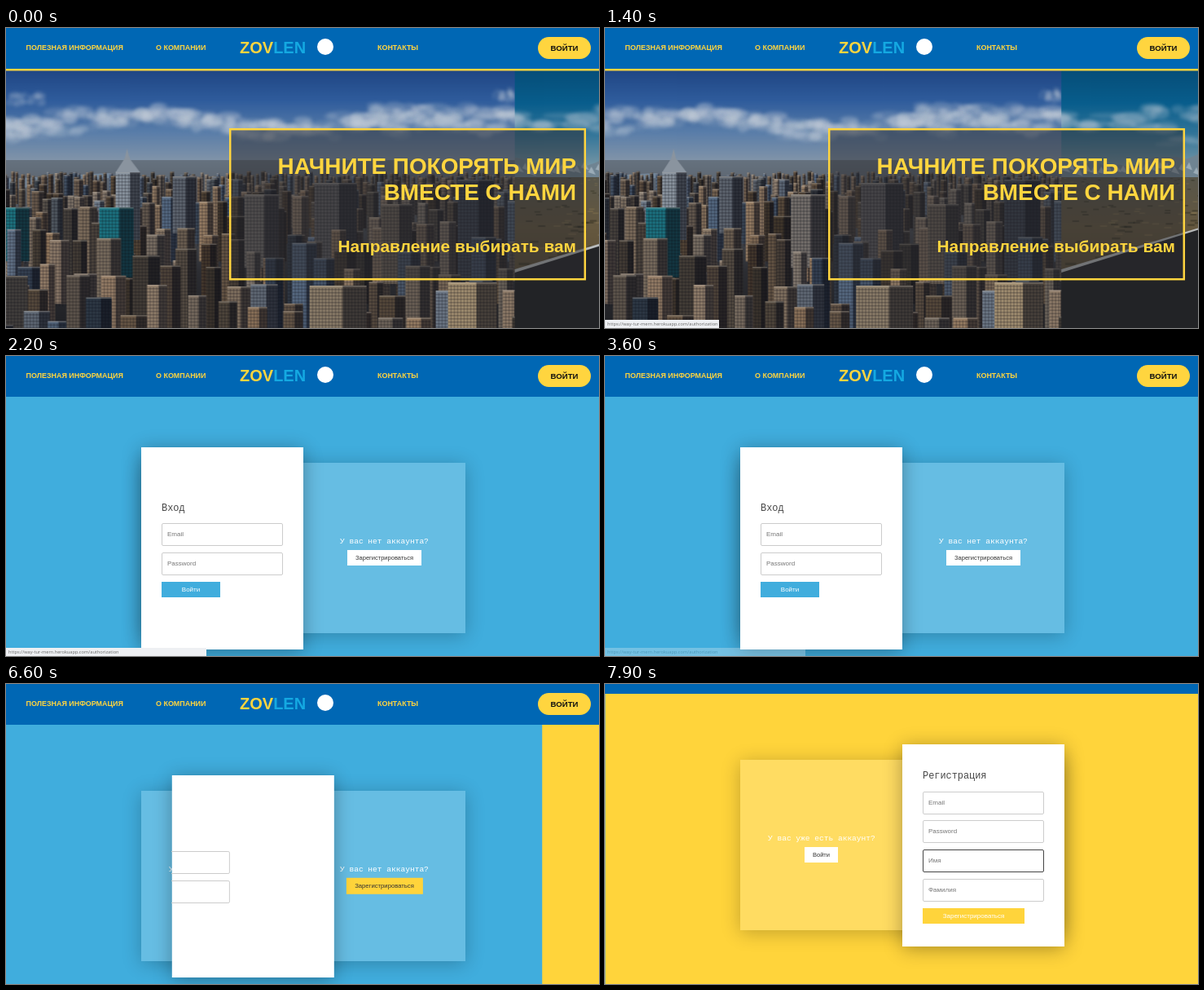
Write an HTML page with a canvas that moves like this. It is 728 px wide and 368 px high and loops after 8 s.

```html
<!DOCTYPE html>
<html lang="ru">
<head>
<meta charset="utf-8">
<title>Вход</title>
<style>
html, body { margin: 0; width: 100%; height: 100%; overflow: hidden; }
#stage { position: absolute; left: 0; top: 0; width: 728px; height: 368px; overflow: hidden; background: #40addd; font-family: "Liberation Sans", Arial, sans-serif; }
#stage *, canvas { position: absolute; box-sizing: border-box; white-space: nowrap; }
#strip { left: 0; top: 0; width: 1456px; height: 368px; }
#road { left: 728px; }
svg { left: 0; top: 0; overflow: visible; }
svg text { font-weight: bold; fill: #ffd53f; }
#page, #auth { left: 0; top: 0; width: 728px; height: 420px; }
#auth { background: #40addd; overflow: hidden; }
#yellow { left: 0; top: 0; width: 728px; height: 420px; background: #ffd43b; }
#panel { left: 166px; top: 131px; width: 398px; height: 209px; background: rgba(255,255,255,.2); box-shadow: 0 3px 22px rgba(0,0,0,.24); }
#card { left: 166px; top: 112px; width: 199px; height: 248px; background: #fff; overflow: hidden; }
#shade { left: 166px; top: 112px; width: 199px; height: 248px; box-shadow: 0 3px 22px rgba(0,0,0,.32); }
.form { left: 0; top: 0; width: 199px; height: 248px; }
.mono { font: 9.55px/12px "Liberation Mono", "Courier New", monospace; color: #fff; }
.title { left: 25px; font: 11.9px/16px "Liberation Mono", "Courier New", monospace; color: #484848; }
.field { left: 25px; width: 149px; height: 28px; border: 1px solid #ccc; border-radius: 2px; padding-left: 6px; font-size: 8px; line-height: 26px; color: #757575; }
.send { left: 25px; height: 19px; font-size: 8px; line-height: 19px; color: #fff; text-align: center; }
.pick { top: 238px; height: 19px; background: #fff; color: #333; font-size: 7.5px; line-height: 19px; text-align: center; }
#status { left: 0; top: 358px; height: 10px; width: 140px; padding-left: 3px; background: #eef0f3; color: #666; font: 5.65px/10px "Open Sans", sans-serif; }
</style>
</head>
<body>
<div id="stage">
  <div id="strip">
    <canvas id="city" width="728" height="368"></canvas>
    <canvas id="road" width="728" height="368"></canvas>
  </div>
  <svg id="hero" width="728" height="368">
    <rect y="50" width="728" height="2.5" fill="#ffd53f"/>
    <rect x="275.2" y="124.2" width="435.6" height="184" fill="rgba(42,42,46,.5)" stroke="#ffd53f" stroke-width="2.5"/>
    <g text-anchor="end">
      <text x="700" y="179" font-size="27.9">НАЧНИТЕ ПОКОРЯТЬ МИР</text>
      <text x="700" y="211" font-size="27.9">ВМЕСТЕ С НАМИ</text>
      <text x="700" y="275" font-size="20.85">Направление выбирать вам</text>
    </g>
  </svg>
  <div id="page">
    <div id="auth">
      <div id="yellow"></div>
      <div id="panel"></div>
      <div class="mono" style="left:200px;top:222px">У вас уже есть аккаунт?</div>
      <div class="pick" style="left:245px;width:41px">Войти</div>
      <div class="mono" style="left:410px;top:222px">У вас нет аккаунта?</div>
      <div class="pick" id="join" style="left:419px;width:91px">Зарегистрироваться</div>
      <div id="shade"></div>
      <div id="card">
        <div class="form" id="signin">
          <div class="title" style="top:67px">Вход</div>
          <div class="field" id="email" style="top:93px">Email</div>
          <div class="field" style="top:129px">Password</div>
          <div class="send" style="top:165px;width:72px;background:#40addd">Войти</div>
        </div>
        <div class="form" id="signup">
          <div class="title" style="top:31px">Регистрация</div>
          <div class="field" style="top:58px">Email</div>
          <div class="field" style="top:93px">Password</div>
          <div class="field" id="first" style="top:129px">Имя</div>
          <div class="field" style="top:165px">Фамилия</div>
          <div class="send" style="top:201px;width:125px;background:#ffd43b">Зарегистрироваться</div>
        </div>
      </div>
    </div>
    <svg width="728" height="50">
      <rect width="728" height="50" fill="#0067b4"/>
      <g font-size="8.95">
        <text x="24.5" y="26.5">ПОЛЕЗНАЯ ИНФОРМАЦИЯ</text>
        <text x="184" y="26.5">О КОМПАНИИ</text>
        <text x="456" y="26.5">КОНТАКТЫ</text>
      </g>
      <text x="287" y="31" font-size="20">ZOV<tspan fill="#14a9e2">LEN</tspan></text>
      <circle cx="392" cy="23" r="10" fill="#fff"/>
      <rect x="653" y="11" width="65" height="27" rx="13.5" fill="#ffd53f"/>
      <text x="685.5" y="27.7" font-size="9.6" text-anchor="middle" style="fill:#111">ВОЙТИ</text>
    </svg>
  </div>
  <div id="status">https://way-tur-mern.herokuapp.com/authorization</div>
</div>
<script>
const LOOP = 8000, W = 728;
const $ = id => document.getElementById(id);

let seed = 11;
const rnd = () => (seed = seed * 16807 % 2147483647) / 2147483647;
const span = (a, b) => a + rnd() * (b - a);

function fade(g, y0, y1, colors) {
  const grad = g.createLinearGradient(0, y0, 0, y1);
  colors.forEach((c, i) => grad.addColorStop(i / (colors.length - 1), c));
  g.fillStyle = grad;
  g.fillRect(0, y0, W, y1 - y0);
}

function poly(g, color, ...pts) {
  g.fillStyle = color;
  g.beginPath();
  pts.forEach(([x, y]) => g.lineTo(x, y));
  g.fill();
}

function cloud(g, x, y, w, h) {
  g.save();
  g.filter = 'blur(2px)';
  for (let i = 0; i < 16; i++) {
    g.fillStyle = `rgba(200,208,218,${span(.1, .36)})`;
    g.beginPath();
    g.ellipse(x + span(-w, w) * .5, y + span(-h, h) * .5, w * span(.06, .2), h * span(.15, .4), 0, 0, 7);
    g.fill();
  }
  g.restore();
}

function tower(g, x, y, w, h, color) {
  g.fillStyle = color;
  g.fillRect(x, y, w, h);
  g.fillStyle = 'rgba(15,16,22,.24)';
  for (let j = y + 4; j < y + h; j += 4) g.fillRect(x, j, w, 1.5);
  for (let i = x + 3; i < x + w; i += 4) g.fillRect(i, y + 3, 1.5, h);
  g.fillStyle = 'rgba(14,16,24,.6)';
  g.fillRect(x + w * .58, y, w * .42, h);
  g.fillStyle = 'rgba(210,200,185,.3)';
  g.fillRect(x, y, w, 1.5);
}

// x, top, width, height, colour, depth row
const landmarks = [
  [308, 182, 28, 70, '#5d646e', 4], [238, 176, 30, 84, '#8a949f', 5],
  [92, 220, 40, 66, '#1d7480', 5], [396, 204, 42, 90, '#746f6b', 5],
  [482, 190, 52, 110, '#605e60', 5], [218, 220, 42, 86, '#1c7280', 6],
  [564, 216, 38, 98, '#6d6257', 6], [658, 186, 44, 125, '#3b424e', 6],
  [66, 304, 64, 70, '#8f8474', 8], [476, 316, 70, 60, '#8a7c68', 9],
  [646, 312, 60, 60, '#a08d70', 9]
];

function drawCity(g) {
  fade(g, 50, 166, ['#1f4583', '#2f5c9c', '#597da9', '#8596a8']);
  for (let x = 0; x < W; x += 42) cloud(g, x, 116 + 9 * Math.sin(x / 58), 90, 20);
  [[130, 87, 46, 12], [585, 101, 70, 14], [640, 122, 130, 18], [714, 82, 26, 12]].forEach(c => cloud(g, ...c));
  fade(g, 162, 368, ['#66727f', '#4f535a', '#2c2d32', '#1f2024']);
  poly(g, '#74879a', [0, 188], [120, 184], [230, 178], [230, 184], [90, 200], [0, 210]);
  for (let k = 0; k < 10; k++) {
    const base = 186 + k * 12 + k * k * 1.4, w = 5 + k * 3.4;
    for (let x = -span(0, w); x < W; x += w * span(.8, 1.5)) {
      const h = (8 + k * 8) * span(.4, 1.3);
      const warm = rnd() < .78;
      tower(g, x, base - h, w * span(.6, 1.05), h + 30,
        `hsl(${warm ? 30 : 214},${span(8, 22)}%,${span(20, 50)}%)`);
    }
    landmarks.filter(b => b[5] === k).forEach(b => tower(g, ...b));
    if (k === 5) poly(g, '#8a949f', [238, 177], [249, 160], [252, 148], [255, 160], [268, 177]);
  }
}

function drawRoad(g) {
  fade(g, 50, 175, ['#064d78', '#085d8c', '#36779a', '#7f9aa6']);
  [[60, 114, 150, 22], [170, 104, 120, 18], [300, 118, 160, 14], [430, 92, 130, 14],
   [540, 116, 150, 18], [660, 104, 120, 18], [230, 140, 220, 10]].forEach(c => cloud(g, ...c));
  const ridge = [[0, 188]];
  for (let x = 0; x <= W; x += 14) ridge.push([x, 163 + 4 * Math.sin(x / 37) + span(-5, 5)]);
  poly(g, '#6f8492', ...ridge, [W, 188]);
  for (let x = 4; x < W; x += 9) {
    const y = span(164, 172);
    poly(g, 'rgba(200,212,220,.5)', [x, y], [x + span(3, 9), y + 10], [x - 4, y + 7]);
  }
  fade(g, 183, 368, ['#57554a', '#65583f', '#5a4d35', '#40372a']);
  for (let i = 0; i < 700; i++) {
    const d = rnd() ** 1.6;
    g.fillStyle = rnd() < .5 ? 'rgba(35,35,24,.4)' : 'rgba(150,128,88,.3)';
    g.fillRect(span(0, W), 184 + d * 120, 3 + d * 12, 1 + d * 2.5);
  }
  poly(g, '#222326', [367, 186], [0, 298], [0, 368], [W, 368], [W, 298]);
  poly(g, '#b9bcbd', [362, 187], [0, 296], [0, 300]);
  poly(g, '#b9bcbd', [372, 187], [W, 296], [W, 300]);
  poly(g, '#d79f1f', [361, 280], [373, 280], [381, 368], [352, 368]);
  poly(g, '#c9971f', [365.5, 226], [369.5, 226], [370.5, 234], [364.5, 234]);
  poly(g, '#a98528', [366.3, 205], [368, 205], [368.5, 212], [366, 212]);
}

drawCity($('city').getContext('2d'));
drawRoad($('road').getContext('2d'));

// steps: [ms, value, easing towards the next step]
function run(id, prop, steps) {
  const frames = steps.map(([ms, v, easing = 'step-end']) => ({ offset: ms / LOOP, [prop]: v, easing }));
  frames.push({ offset: 1, [prop]: steps.at(-1)[1] });
  $(id).animate(frames, { duration: LOOP, iterations: Infinity });
}
const tx = x => `translateX(${x}px)`;
const move = (id, at, len, from, to, easing) =>
  run(id, 'transform', [[0, tx(from)], [at, tx(from), easing], [at + len, tx(to)]]);

const CYCLE = 1305, LEAD = 321;
const slide = [];
for (let ms = 0; ms <= 2200; ms += 20) {
  const t = (ms + LEAD) % CYCLE / CYCLE;
  const p = (1 - Math.cos(Math.PI * t)) / 2;
  slide.push([ms, tx(-Math.max(4, W * p))]);
}
run('strip', 'transform', slide);

const OPEN = 2200, CLICK = 6450;
run('hero', 'opacity', [[0, 1], [OPEN, 0]]);
run('auth', 'opacity', [[0, 0], [OPEN, 1]]);
run('status', 'opacity', [[0, 0], [1200, 1], [3600, .3], [3800, 0]]);
run('status', 'width', [[0, '140px'], [OPEN, '246px']]);
run('email', 'borderColor', [[0, '#ccc'], [4800, '#555'], [5500, '#ccc']]);
run('first', 'borderColor', [[0, '#ccc'], [7800, '#444']]);
run('join', 'backgroundColor', [[0, '#fff'], [5950, '#fff', 'ease'], [6350, '#ffd43b']]);
run('join', 'transform', [[0, 'scale(1)'], [5950, 'scale(1)', 'ease'], [6350, 'scale(1.025)']]);

move('yellow', CLICK, 1500, W, 0, 'ease');
move('card', CLICK, 500, 0, 199, 'ease-in-out');
move('shade', CLICK, 500, 0, 199, 'ease-in-out');
move('signin', CLICK, 500, 0, -199, 'ease');
move('signup', CLICK + 250, 500, 199, 0, 'ease');
run('page', 'transform', [[0, 'translateY(0)'], [7200, 'translateY(0)', 'ease-in-out'], [7500, 'translateY(-38px)']]);
</script>
</body>
</html>
```
